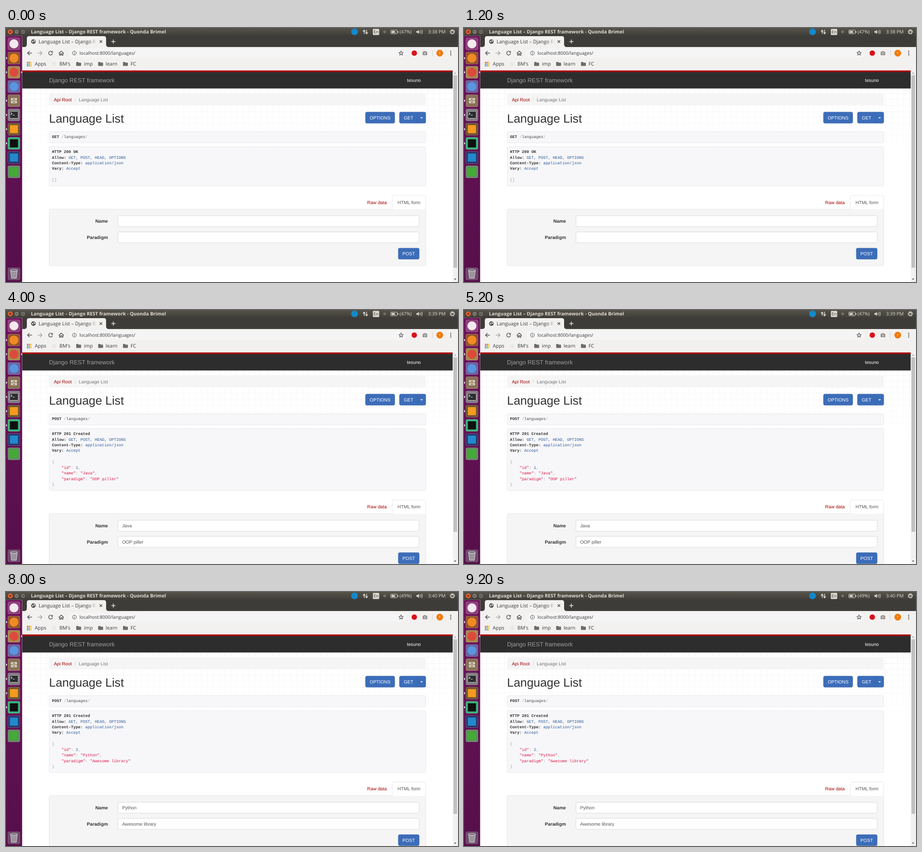
These frames come from a looping animation (998x561 px, 10000 ms). An HTML page:

```html
<!DOCTYPE html>
<html lang="en">
<head>
<meta charset="utf-8">
<title>Language List</title>
<style>
  html, body { margin: 0; width: 100%; height: 100%; overflow: hidden; background: #fff; }
  svg { display: block; width: 100%; height: 100%; }
  text { text-rendering: geometricPrecision; }
  .ui { font-family: "Open Sans", "Noto Sans", sans-serif; font-size: 10.9px; fill: #3a3a3a; }
  .panel { font-size: 10.4px; fill: #dfdbd2; }
  .page { font-family: "Liberation Sans", Arial, sans-serif; font-size: 10.23px; fill: #333; }
  .code { font-family: "Liberation Mono", monospace; font-size: 8.77px; fill: #48484c; }
  .key { font-weight: bold; fill: #333; }
  .lit { fill: #2a5695; }
  .str { fill: #dc1244; }
  .pun { fill: #93a1a1; }
  .bold { font-weight: bold; }
  .mid { text-anchor: middle; }
  .end { text-anchor: end; }
  .white { fill: #fff; }
  .red { fill: #a30000; }
  .grey { fill: #555; }
  .line { fill: none; stroke: #4a4a4a; stroke-width: 1.4; }
  .btn { fill: #3c6db9; stroke: #335fa5; stroke-width: .73; }
  .pre { fill: #f7f7f9; stroke: #e1e1e8; stroke-width: .73; }
  .input { fill: #fff; stroke: #ccc; stroke-width: .73; }
  .input.focus { stroke: #66afe9; filter: drop-shadow(0 0 2.2px rgba(102, 175, 233, .75)); }
</style>
</head>
<body>
<svg viewBox="0 0 998 561" preserveAspectRatio="none">
  <defs>
    <linearGradient id="bar" x2="0" y2="1"><stop stop-color="#55534a"/><stop offset="1" stop-color="#3e3d38"/></linearGradient>
    <linearGradient id="dock" x2="0" y2="1"><stop stop-color="#6b1159"/><stop offset="1" stop-color="#560f4b"/></linearGradient>
    <linearGradient id="fade" gradientUnits="userSpaceOnUse" x1="184" x2="200"><stop stop-color="#3a3a3a"/><stop offset="1" stop-color="#3a3a3a" stop-opacity="0"/></linearGradient>
    <linearGradient id="veil" x2="0" y2="1"><stop stop-color="#fff" stop-opacity="0"/><stop offset="1" stop-color="#fff"/></linearGradient>
    <pattern id="grid" x="36.5" y="131" width="13.15" height="13.15" patternUnits="userSpaceOnUse">
      <path d="M.5 0V13.15M0 .5H13.15" stroke="#f1f1f1" stroke-width=".8"/>
    </pattern>
  </defs>
  <rect width="998" height="561" fill="#fff"/>

  <!-- page -->
  <rect x="36" y="133" width="950.5" height="165" fill="url(#grid)"/>
  <rect x="36" y="133" width="950.5" height="166" fill="url(#veil)"/>
  <rect x="36" y="96" width="950.5" height="37.6" fill="#2d2d2d"/>
  <rect x="36" y="93.5" width="950.5" height="3.8" fill="#a90000"/>
  <g class="page">
    <text x="95" y="119.8" font-size="13.15" fill="#9d9d9d">Django REST framework</text>
    <text class="white end" x="916" y="119">tesuno</text>
    <rect x="95" y="145" width="832" height="25.6" rx="3" fill="#f5f5f5"/>
    <text class="red" x="105.8" y="161.6">Api Root</text>
    <text x="151.6" y="161.6" fill="#ccc">/</text>
    <text x="160.8" y="161.6" fill="#777">Language List</text>
    <text x="95" y="209" font-size="26.3">Language List</text>
    <rect class="btn" x="793.8" y="185.8" width="64.4" height="24.4" rx="3"/>
    <text class="white mid" x="826" y="201.8">OPTIONS</text>
    <rect class="btn" x="868.8" y="185.8" width="58" height="24.4" rx="3"/>
    <path d="M908.5 186V210" stroke="#335fa5" stroke-width=".8"/>
    <text class="white mid" x="888.8" y="201.8">GET</text>
    <path class="white" d="M914.8 197.2h5.8l-2.9 2.9z"/>
  </g>
  <rect class="pre" x="95.3" y="228.8" width="831.5" height="25" rx="3"/>
  <rect class="pre" id="response" x="95.3" y="261.8" width="831.5" height="87" rx="3"/>
  <g class="code" id="code"></g>

  <g class="page" id="form">
    <rect x="95.3" y="400" width="831.5" height="125" rx="3" fill="#f5f5f5" stroke="#e0e0e0" stroke-width=".73"/>
    <path d="M852.8 400.6V373q0-3 3-3H923.8q3 0 3 3V400.6" fill="#fff" stroke="#ddd" stroke-width=".73"/>
    <text class="red" x="797.6" y="388.6">Raw data</text>
    <text class="grey" x="864.4" y="388.6">HTML form</text>
    <text class="bold end" x="225" y="430.4">Name</text>
    <text class="bold end" x="225" y="466">Paradigm</text>
    <rect class="input" x="247.2" y="414.6" width="665" height="24.2" rx="3"/>
    <rect class="input" id="paradigmBox" x="247.2" y="450.3" width="665" height="24.2" rx="3"/>
    <text class="grey" id="name" x="256.4" y="430.4"></text>
    <text class="grey" id="paradigm" x="256.4" y="466"></text>
    <rect class="btn" x="866.2" y="486.2" width="46" height="24.4" rx="3"/>
    <text class="white mid" x="889.2" y="502.2">POST</text>
  </g>

  <!-- scrollbar -->
  <rect x="986.5" y="93.5" width="11.5" height="468" fill="#f1f1f1"/>
  <rect id="thumb" x="988" y="104.5" width="8" height="425" fill="#c1c1c1"/>
  <path d="M989.2 101h5l-2.5-3z" fill="#a3a3a3"/>
  <path d="M989.2 553.5h5l-2.5 3z" fill="#505050"/>

  <!-- browser -->
  <rect x="36" y="17" width="962" height="25" fill="#3d3c38"/>
  <path d="M40 42q6 0 6-6V23q0-5 5-5H216q5 0 5 5V36q0 6 6 6z" fill="#f2f1f0"/>
  <rect x="36" y="42" width="962" height="51.5" fill="#f2f1f0"/>
  <rect x="138" y="45.5" width="746" height="20.5" rx="10.2" fill="#f6f5f5"/>
  <g class="ui">
    <circle cx="60.5" cy="30" r="5" fill="#4d4d4d"/>
    <path d="M57 28l3 1 .5 2-2 1.5zM61 26l3 2-.5 3-2-1.5z" fill="#f2f1f0"/>
    <text x="72" y="33.8" fill="url(#fade)" style="fill:url(#fade)">Language List – Django RE</text>
    <path class="line" d="M206.7 27.2l5.6 5.6m0-5.6l-5.6 5.6"/>
    <path d="M232.5 30h9m-4.5-4.5v9" stroke="#e8e6e1" stroke-width="1.5"/>
    <path class="line" d="M57.2 55.5H47.5M52 51l-4.5 4.5 4.5 4.5"/>
    <path class="line" d="M70 55.5h9.7M75.2 51l4.5 4.5-4.5 4.5" style="stroke:#a5a4a2"/>
    <path class="line" d="M102 52.8a4.3 4.3 0 1 0 .8 3.4"/>
    <path d="M103.3 50.5v4h-4z" fill="#4a4a4a"/>
    <path class="line" d="M116.5 56l5.5-5 5.5 5M118.3 55v5h2.4v-3.4h2.6V60h2.4v-5"/>
    <circle class="line" cx="151" cy="55.5" r="4.3" style="stroke-width:1"/>
    <path class="line" d="M151 55v3M151 52.8v1.1" style="stroke-width:1.1"/>
    <text x="162.3" y="59.2" font-size="10.1" style="font-size:10.1px">localhost:8000/languages/</text>
    <path id="star" class="line" style="stroke-width:1.1"/>
    <circle cx="901.5" cy="55.5" r="6" fill="#d8131b"/>
    <path d="M920 52.5h2.5l1-1.5h3l1 1.5h2.5v7.5h-10z" fill="#8b8b8b"/>
    <circle cx="925" cy="56" r="2" fill="#8b8b8b" stroke="#f2f1f0"/>
    <path d="M941.5 49v13" stroke="#d2d0cd"/>
    <circle cx="957.7" cy="55.5" r="7.4" fill="#f07a0c"/>
    <text class="white mid" x="957.7" y="58" style="font-size:7px;fill:#fff">T</text>
    <g id="dots" fill="#4a4a4a"></g>
    <g id="apps"></g>
    <circle cx="106" cy="79.5" r="4.5" fill="#e9e8e6"/>
    <text x="63.6" y="83.3">Apps</text>
    <text x="118" y="83.3">BM's</text>
    <text x="172" y="83.3">imp</text>
    <text x="220" y="83.3">learn</text>
    <text x="275" y="83.3">FC</text>
    <g id="folders" fill="#6c6b69"></g>
  </g>

  <!-- desktop panel -->
  <rect width="998" height="17.5" fill="url(#bar)"/>
  <g class="ui">
    <circle cx="9.5" cy="8.5" r="5.4" fill="#ea5f2f"/>
    <path d="M7.5 6.5l4 4m0-4l-4 4" stroke="#5a2412" stroke-width="1.2"/>
    <g fill="#7d7b72" stroke="#35342f" stroke-width=".8"><circle cx="23.5" cy="8.5" r="5.2"/><circle cx="37.5" cy="8.5" r="5.2"/></g>
    <path d="M21 8.5h5M35.3 6.8h4.4v3.6h-4.4z" fill="none" stroke="#3c3b37"/>
    <text class="panel bold" x="55" y="12.3" style="font-size:10.6px">Language List – Django REST framework - Quonda Brimel</text>
    <circle cx="769.6" cy="8.6" r="7.4" fill="#1489c9"/>
    <path d="M790.8 13V5m-2.6 3l2.6-3.5 2.6 3.5M796.2 4v8m-2.6-2.5l2.6 3.5 2.6-3.5" fill="none" stroke="#dfdbd2" stroke-width="1.5"/>
    <rect x="810" y="2" width="14" height="13.5" rx="1.5" fill="#dfdbd2"/>
    <text class="mid" x="817" y="12.3" style="font-size:9.5px">En</text>
    <circle cx="836" cy="8.5" r="3" fill="#74726a"/>
    <rect x="849.5" y="4.7" width="14.5" height="8" rx="1.5" fill="none" stroke="#dfdbd2"/>
    <path d="M851.3 6.5h6v4.4h-6zM864.5 7h1.8v3.4h-1.8z" fill="#dfdbd2"/>
    <path d="M858.8 6l-2 3h3l-1.6 2.6" fill="none" stroke="#dfdbd2"/>
    <text class="panel" id="battery" x="869" y="12.3"></text>
    <path d="M906 7h2.5l3.2-3v9.2l-3.2-3H906z" fill="#dfdbd2"/>
    <path d="M913.5 6.2q1.5 2.4 0 4.8M915.6 4.8q2.6 3.8 0 7.6M917.8 3.6q3.4 5 0 10" fill="none" stroke="#dfdbd2"/>
    <text class="panel" id="clock" x="931.8" y="12.3"></text>
    <circle cx="985.5" cy="8.5" r="3.3" fill="none" stroke="#dfdbd2" stroke-width="1.4"/>
    <circle cx="985.5" cy="8.5" r="4.9" fill="none" stroke="#dfdbd2" stroke-width="1.8" stroke-dasharray="1.8 2.05"/>
    <path d="M985.5 3.5v4.5" stroke="#dfdbd2" stroke-width="1.3"/>
  </g>

  <!-- launcher -->
  <rect y="17.5" width="35.6" height="543.5" fill="url(#dock)"/>
  <g id="tiles"></g>
  <path d="M10 154h15v13H10zM10 160.5h15" fill="#d9cdb6" stroke="#6b5a45"/>
  <path d="M15 157.5h5M15 164h5" stroke="#6b5a45" stroke-width="1.4"/>
  <rect x="8" y="184" width="19" height="15.5" rx="1.5" fill="#2c2b2e" stroke="#d3d1cf"/>
  <path d="M10.5 187l3 2.4-3 2.4M15 192.5h4" fill="none" stroke="#fff" stroke-width="1.1"/>
  <path d="M10 535.5h15l-2 17.5H12z" fill="#a79fa8" stroke="#dcd7dc" stroke-width=".8"/>
  <path d="M13.5 538l1 13M17.5 538v13M21.5 538l-1 13" stroke="#837a86"/>
  <ellipse cx="17.5" cy="535" rx="8.2" ry="2" fill="#6b6070" stroke="#e8e5e8"/>
  <g id="pips" fill="#e5dce3"></g>
</svg>
<script>
const STEP = 2000;
const java = { name: 'Java', paradigm: 'OOP piller' };
const python = { name: 'Python', paradigm: 'Awesome library' };
const empty = { name: '', paradigm: '' };
const steps = [
  { clock: '3:38', battery: 47, form: empty },
  { clock: '3:39', battery: 47, form: java },
  { clock: '3:39', battery: 47, form: java, saved: { id: 1, ...java } },
  { clock: '3:40', battery: 49, form: python, saved: { id: 1, ...java }, focus: true },
  { clock: '3:40', battery: 49, form: python, saved: { id: 2, ...python } }
];

const $ = id => document.getElementById(id);
const LINE = 12.42;
const GROW = 4 * LINE;

const span = (cls, text) => `<tspan class="${cls}">${text}</tspan>`;
const codeLine = (y, html) => `<text x="101.4" y="${y}" xml:space="preserve">${html}</text>`;
const header = (key, value) => span('key', key + ':') + ' ' + span('lit', value);
const field = (key, value, last) =>
  '    ' + span('str', `"${key}"`) + span('pun', ':') + ' ' +
  (typeof value === 'number' ? span('lit', value) : span('str', `"${value}"`)) +
  (last ? '' : span('pun', ','));

function codeHtml(saved) {
  const body = saved
    ? [span('pun', '{'), field('id', saved.id), field('name', saved.name),
       field('paradigm', saved.paradigm, true), span('pun', '}')]
    : [span('pun', '[]')];
  const lines = [
    span('key', saved ? 'HTTP 201 Created' : 'HTTP 200 OK'),
    header('Allow', 'GET, POST, HEAD, OPTIONS'),
    header('Content-Type', 'application/json'),
    header('Vary', 'Accept'),
    '',
    ...body
  ];
  const request = span('key', saved ? 'POST' : 'GET') + ' ' +
    span('pun', '/') + 'languages' + span('pun', '/');
  return codeLine(243.4, request) +
    lines.map((html, i) => codeLine(276.2 + i * LINE, html)).join('');
}

function render({ clock, battery, form, saved, focus }) {
  const grow = saved ? GROW : 0;
  $('clock').textContent = clock + ' PM';
  $('battery').textContent = `(${battery}%)`;
  $('name').textContent = form.name;
  $('paradigm').textContent = form.paradigm;
  $('paradigmBox').classList.toggle('focus', !!focus);
  $('response').setAttribute('height', 87 + grow);
  $('form').setAttribute('transform', `translate(0 ${grow})`);
  $('thumb').setAttribute('height', saved ? 385.5 : 425);
  $('code').innerHTML = codeHtml(saved);
}

function drawIcons() {
  // Tile colour, then the plain shape on it
  const tiles = [
    ['#8f4079', 'circle', '#f3e9ef'],
    ['#91552f', 'circle', '#f08a24'],
    ['#a78a4c', 'circle', '#dc4a3c'],
    ['#6a64a0', 'circle', '#5a95e0'],
    ['#8c7058'],
    ['#7f7b82'],
    ['#6a5430', 'square', '#f39a1f'],
    ['#35b57a', 'square', '#101010'],
    ['#2b3568', 'square', '#2388cc'],
    ['#5f8d60', 'square', '#43ab35']
  ];
  const tile = (y, fill) =>
    `<rect x="4.2" y="${y - 13.3}" width="26.6" height="26.6" rx="3" fill="${fill}" stroke="#fff" stroke-opacity=".3" stroke-width=".8"/>`;
  const shape = (kind, y, fill) => kind === 'circle'
    ? `<circle cx="17.5" cy="${y}" r="10" fill="${fill}"/>`
    : `<rect x="8.5" y="${y - 9}" width="18" height="18" fill="${fill}"/>`;
  const tileY = i => 35 + i * 31.4;
  $('tiles').innerHTML = tile(543, '#6d4869') + tiles.map(([back, kind, fill], i) =>
    tile(tileY(i), back) + (kind ? shape(kind, tileY(i), fill) : '')).join('');
  $('pips').innerHTML = [1, 2, 4, 5, 6, 7].map(i => `<path d="M0 ${tileY(i) - 3}l3 3-3 3z"/>`).join('') +
    `<path d="M35.6 ${tileY(2) - 3}l-3 3 3 3z"/>`;

  const hues = ['#db4437', '#db4437', '#f4b400', '#0f9d58', '#4285f4', '#f4b400', '#0f9d58', '#4285f4', '#f4b400'];
  $('apps').innerHTML = hues.map((fill, i) =>
    `<rect x="${46.2 + i % 3 * 3.7}" y="${74.8 + Math.floor(i / 3) * 3.7}" width="2.5" height="2.5" fill="${fill}"/>`).join('');
  $('folders').innerHTML = [155, 203.5, 258.3].map(x =>
    `<path d="M${x} 76q0-1 1-1h3.2l1.3 1.4h4.3q1 0 1 1v5.4q0 1-1 1H${x + 1}q-1 0-1-1z"/>`).join('');
  $('dots').innerHTML = [51.5, 55.5, 59.5].map(y => `<circle cx="982" cy="${y}" r="1.2"/>`).join('');

  const points = Array.from({ length: 10 }, (_, i) => {
    const r = i % 2 ? 2.2 : 5, a = i * Math.PI / 5;
    return `${872.3 + r * Math.sin(a)} ${55.8 - r * Math.cos(a)}`;
  });
  $('star').setAttribute('d', `M${points.join('L')}z`);
}

drawIcons();
let shown = -1;
const start = performance.now();
function tick() {
  const i = Math.floor((performance.now() - start) / STEP) % steps.length;
  if (i !== shown) render(steps[shown = i]);
  requestAnimationFrame(tick);
}
tick();
</script>
</body>
</html>
```
